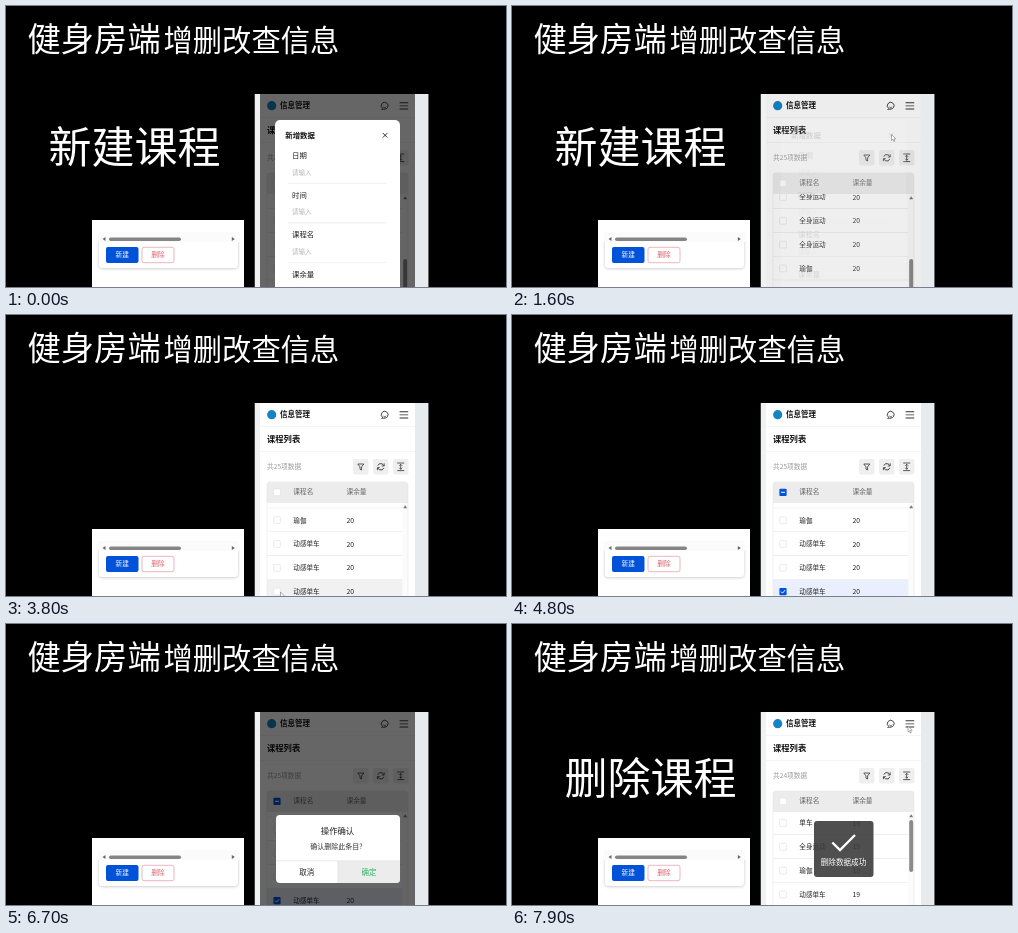
An HTML page with a canvas for the animation above (8 s loop, 500x281 px).

```html
<!DOCTYPE html>
<html lang="zh-CN">
<head>
<meta charset="utf-8">
<style>
html, body { margin: 0; width: 100%; height: 100%; overflow: hidden; background: #000; }
canvas { display: block; }
</style>
</head>
<body>
<canvas id="stage" width="500" height="281"></canvas>
<script>
const c = document.getElementById('stage').getContext('2d');
const LOOP = 8000, ROW = 23.8, CHECKED = 12;
const FONT = '"Noto Sans CJK SC", "Noto Sans CJK", sans-serif';

const clamp = v => Math.max(0, Math.min(1, v));
const ease = v => (v = clamp(v), v * v * (3 - 2 * v));

// Eased value from [time, value] keys.
function track(t, keys) {
  let v = keys[0][1];
  for (let i = 1; i < keys.length; i++) {
    const [t0, a] = keys[i - 1], [t1, b] = keys[i];
    if (t >= t0) v = a + (b - a) * ease((t - t0) / (t1 - t0));
  }
  return v;
}

function text(s, x, y, size, color, weight = 400, align = 'left') {
  c.font = `${weight} ${size}px ${FONT}`;
  c.textAlign = align;
  c.textBaseline = 'alphabetic';
  c.fillStyle = color;
  c.fillText(s, x, y + size * 0.37);
}

function rect(x, y, w, h, color, r = 0) {
  c.fillStyle = color;
  c.beginPath();
  c.roundRect(x, y, w, h, r);
  c.fill();
}

function frame(x, y, w, h, color, r = 0, width = 0.7) {
  c.strokeStyle = color;
  c.lineWidth = width;
  c.beginPath();
  c.roundRect(x, y, w, h, r);
  c.stroke();
}

function path(points, color, width, fill) {
  c.beginPath();
  points.forEach(([x, y]) => c.lineTo(x, y));
  c.lineWidth = width;
  c.strokeStyle = color;
  if (fill) { c.closePath(); c.fillStyle = fill; c.fill(); }
  if (width) c.stroke();
}

function arc(x, y, r, a, b, color, width) {
  c.beginPath();
  c.arc(x, y, r, a, b);
  c.strokeStyle = color;
  c.lineWidth = width;
  c.stroke();
}

function fade(alpha, draw) {
  if (alpha <= 0) return;
  c.save();
  c.globalAlpha = alpha;
  draw();
  c.restore();
}

function buttonPanel() {
  rect(86, 214, 152, 67, '#fff');
  c.save();
  c.shadowColor = 'rgba(0,0,0,.25)';
  c.shadowBlur = 3;
  c.shadowOffsetY = 0.5;
  rect(93, 232, 139, 30, '#fff', 3);
  c.restore();
  rect(92, 226, 141, 10, '#fbfbfb');
  rect(103, 231.4, 72, 3.6, '#858585', 1.8);
  path([[99.5, 231], [99.5, 235], [96.5, 233]], '', 0, '#666');
  path([[225.8, 231], [225.8, 235], [228.8, 233]], '', 0, '#666');
  rect(100, 241, 32.5, 16, '#0052d9', 2);
  frame(136, 241.3, 32, 15.4, '#e39aa0', 2);
  text('新建', 116.2, 249, 6.7, '#fff', 500, 'center');
  text('删除', 152, 249, 6.7, '#d9606a', 400, 'center');
}

function checkbox(y, mark) {
  if (!mark) {
    rect(267.6, y - 3.4, 6.8, 6.8, '#fff', 1);
    frame(267.6, y - 3.4, 6.8, 6.8, '#dedede', 1, 0.6);
    return;
  }
  rect(267.4, y - 3.6, 7.2, 7.2, '#0052d9', 1);
  const points = mark === 'some'
    ? [[269, y], [273, y]]
    : [[269, y], [270.5, y + 1.5], [273.2, y - 1.5]];
  path(points, '#fff', 1);
}

function toolIcons() {
  for (const x of [347, 367, 387]) rect(x, 144, 15.5, 15.5, '#efefef', 2);
  const ink = '#333';
  path([[351.8, 149], [357.8, 149], [355.6, 151.9], [355.6, 155], [354, 154.2], [354, 151.9], [351.8, 149]], ink, 0.8);
  arc(374.8, 151.8, 3.2, 3.5, 5.9, ink, 0.9);
  arc(374.8, 151.8, 3.2, 0.36, 2.76, ink, 0.9);
  path([[378.2, 148.4], [378.2, 151], [375.8, 151]], ink, 0.8);
  path([[371.4, 155.2], [371.4, 152.6], [373.8, 152.6]], ink, 0.8);
  path([[391.2, 148], [398.2, 148]], ink, 0.8);
  path([[391.2, 155.6], [398.2, 155.6]], ink, 0.8);
  path([[394.7, 149.3], [394.7, 154.3]], ink, 0.8);
  path([[393.2, 150.8], [394.7, 149.3], [396.2, 150.8]], ink, 0.7);
  path([[393.2, 152.8], [394.7, 154.3], [396.2, 152.8]], ink, 0.7);
}

function courseName(i, refreshed) {
  if (refreshed) return ['单车', '全身运动', '瑜伽', '动感单车'][i % 4];
  return i < 3 ? '全身运动' : i < 10 ? '瑜伽' : '动感单车';
}

function table(t, cursor) {
  const refreshed = t >= 7400, picked = t >= 4200 && !refreshed;
  const scroll = refreshed ? -8
    : track(t, [[1900, 0], [2500, 79], [2800, 79], [3500, 200]]);

  c.save();
  c.beginPath();
  c.rect(261, 188, 141, 93);
  c.clip();
  for (let i = 0; i < 18; i++) {
    const y = 191 + ROW * i - scroll;
    if (y < 170 || y > 300) continue;
    const top = y - ROW / 2;
    const hover = cursor && cursor[1] > top && cursor[1] < top + ROW;
    if (picked && i === CHECKED) rect(261, top, 141, ROW, '#e9effc');
    else if (hover) rect(261, top, 141, ROW, '#f1f1f1');
    rect(261, top + ROW - 0.6, 141, 0.6, '#e8e8e8');
    checkbox(y, picked && i === CHECKED && 'on');
    text(courseName(i, refreshed), 287.3, y, 6.6, '#222');
    text(refreshed ? '19' : '20', 340.5, y, 6.8, '#222');
  }
  rect(396.3, 188, 5.7, 93, '#fbfbfb');
  const top = refreshed ? 196 : track(t, [[1900, 253], [2500, 257], [2800, 257], [3500, 284]]);
  const end = refreshed ? 248 : track(t, [[1900, 284], [2500, 278], [2800, 278], [3500, 305]]);
  rect(397.2, top, 4, end - top, '#8b8b8b', 2);
  path([[397.2, 193.2], [401.2, 193.2], [399.2, 190.2]], '', 0, '#777');
  c.restore();

  rect(261, 167, 141, 21, '#ececec', [3, 3, 0, 0]);
  frame(261, 167, 141, 130, '#e6e6e6', 3, 0.6);
  checkbox(177.3, picked && 'some');
  text('课程名', 287.3, 177, 6.7, '#666');
  text('课余量', 340.5, 177, 6.7, '#666');
  text(`共${refreshed ? 24 : 25}项数据`, 261, 152, 6.7, '#999');
}

function page(t, cursor) {
  rect(248.5, 88, 174, 193, '#f0f1f3');
  rect(254, 88, 155, 193, '#fff');
  rect(409, 88, 13.5, 193, '#e8ebee');
  c.fillStyle = '#1683c4';
  c.beginPath();
  c.arc(265.7, 99.7, 4.6, 0, 7);
  c.fill();
  text('信息管理', 274, 99.7, 7.5, '#111', 700);
  arc(378.7, 99.7, 3.4, 2.2, 7.9, '#333', 0.9);
  path([[376.7, 102.5], [375.6, 103.4], [379, 103.1]], '#333', 0.8);
  arc(378.7, 100.2, 1.5, 0.3, 2.8, '#333', 0.7);
  for (const y of [96.3, 99.4, 102.5]) rect(393.6, y, 8.6, 0.9, '#333');
  rect(254, 111.5, 155, 0.6, '#ececec');
  text('课程列表', 261, 124, 8.3, '#111', 700);
  rect(254, 136.5, 155, 0.6, '#ececec');
  toolIcons();
  table(t, cursor);
}

function shade() { rect(254, 88, 155, 193, 'rgba(0,0,0,.6)'); }

function form() {
  shade();
  rect(269, 114, 125, 180, '#fff', 5);
  text('新增数据', 279.3, 129.3, 7.4, '#111', 700);
  path([[376.8, 127], [381.4, 131.6]], '#222', 0.9);
  path([[381.4, 127], [376.8, 131.6]], '#222', 0.9);
  ['日期', '时间', '课程名', '课余量'].forEach((label, i) => {
    const y = 149.5 + 39.6 * i;
    text(label, 286, y, 7.4, '#222');
    text('请输入', 286, y + 16.7, 6.5, '#b5b5b5');
    rect(282, y + 27.5, 99, 0.6, '#e6e6e6');
  });
}

function dialog() {
  shade();
  rect(270, 191, 124, 68, '#fff', 4);
  rect(332, 237, 62, 22, '#ececec', [0, 0, 4, 0]);
  rect(270, 236.6, 124, 0.6, '#e2e2e2');
  rect(331.6, 237, 0.6, 22, '#e2e2e2');
  text('操作确认', 331.5, 207.3, 8.4, '#222', 400, 'center');
  text('确认删除此条目?', 330.5, 222.5, 7, '#333', 400, 'center');
  text('取消', 300.8, 248.2, 7.5, '#222', 400, 'center');
  text('确定', 363, 248.2, 7.5, '#2fb55e', 400, 'center');
}

function toast() {
  rect(302, 197, 59.5, 56, 'rgba(60,60,60,.9)', 3);
  path([[320.3, 218.5], [328, 226], [343, 211]], '#fff', 2.4);
  text('删除数据成功', 331.5, 238.2, 7.6, '#fff', 400, 'center');
}

function cursorAt(t) {
  if (t < 600 || (t >= 4950 && t < 7100)) return null;
  if (t < 4950) return [
    track(t, [[600, 345], [1200, 379.5], [1800, 379.5], [2200, 328], [3000, 328], [3500, 274.5]]),
    track(t, [[600, 240], [1200, 128.5], [1800, 128.5], [2200, 277], [4600, 277], [4900, 290]])
  ];
  return [track(t, [[7100, 365], [7600, 396]]), track(t, [[7100, 248], [7600, 102]])];
}

function pointer([x, y]) {
  c.save();
  c.translate(x, y);
  path([[0, 0], [0, 6], [1.4, 4.8], [2.4, 7], [3.3, 6.6], [2.4, 4.4], [4.2, 4.3]], '#777', 0.6, '#fff');
  c.restore();
}

function draw(t) {
  rect(0, 0, 500, 281, '#000');
  text('健身房端', 21.5, 32.5, 33.3, '#fff', 500);
  text('增删改查信息', 157.5, 34, 29.3, '#fff');
  if (t < 2100) text('新建课程', 42.5, 141, 43, '#fff');
  if (t >= 7000) text('删除课程', 52.5, 154.5, 43, '#fff');
  buttonPanel();

  const cursor = cursorAt(t);
  c.save();
  c.beginPath();
  c.rect(248.5, 88, 174, 193);
  c.clip();
  page(t, cursor);
  fade(1 - ease((t - 1350) / 320), form);
  fade(Math.min(ease((t - 6050) / 250), 1 - ease((t - 6900) / 250)), dialog);
  fade(ease((t - 7350) / 200), toast);
  if (cursor) pointer(cursor);
  c.restore();
}

function tick() {
  draw(performance.now() % LOOP);
  requestAnimationFrame(tick);
}
tick();
</script>
</body>
</html>
```
